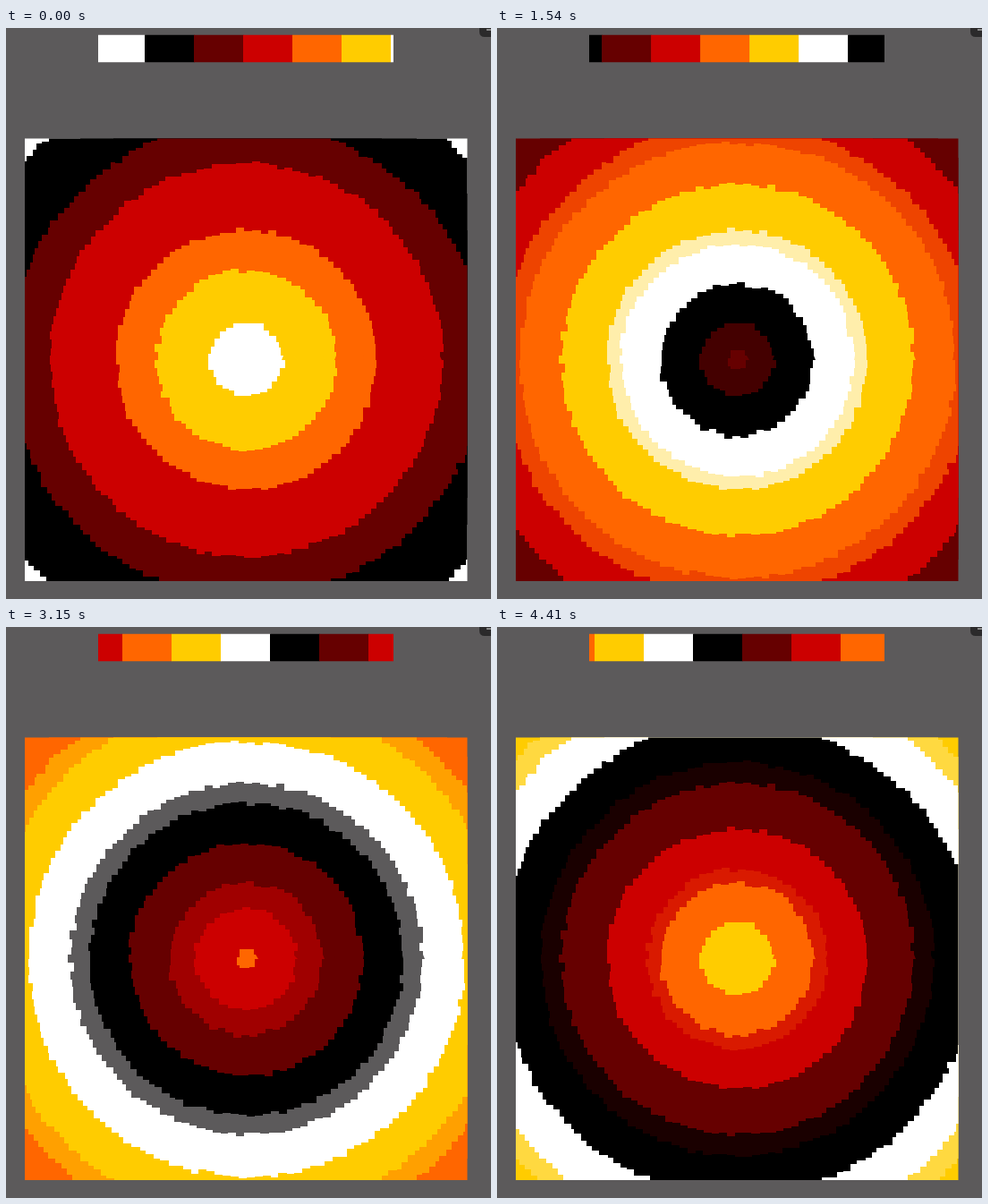
An HTML page for the animation above (4480 ms loop, 542 px wide and 638 px high).

```html
<!DOCTYPE html>
<html lang="en">
<head>
<meta charset="utf-8">
<title>Colour cycling</title>
<style>
  html, body { margin: 0; width: 100%; height: 100%; overflow: hidden; background: #5c5a5b; }
  svg { display: block; }
  .soft { filter: blur(0.5px); }
</style>
</head>
<body>
<svg id="stage" width="542" height="638" viewBox="0 0 542 638">
  <rect width="542" height="638" fill="#5c5a5b"/>
  <g class="soft">
    <svg x="103" y="7.5" width="330" height="31" overflow="hidden"><g id="bar"></g></svg>
  </g>
  <g class="soft">
    <svg id="rings" x="21" y="123.5" width="494.5" height="494.5" viewBox="21 123.5 494.5 494.5" overflow="hidden"></svg>
  </g>
  <path d="M529 0H542V10H535Q529 10 529 4Z" fill="#2b2a2b"/>
  <path d="M537 2H542" stroke="#aaa" stroke-width="1.5"/>
</svg>
<script>
const FRAME_MS = 70, LOOP_MS = 4480;
const CENTER = { x: 268.7, y: 371 };
const SWATCH = 55;
const PALETTE = [[255, 255, 255], [0, 0, 0], [102, 0, 0], [204, 0, 0], [255, 102, 0], [255, 204, 0]];
const GRAY = [92, 90, 91];
const RADII = [11, 41, 57, 85, 100.5, 130, 145, 175, 196.5, 219.5, 243.5, 265, 288, 310.5, 333];
// Colour progress at a few frames, in fifths of a palette step
const PROGRESS = [[0, 0], [14, 5.12], [22, 8.67], [32, 12.2], [45, 17.57], [53, 20.67], [63, 24.25]];

let seed = 7;
const random = () => (seed = (seed * 16807) % 2147483647) / 2147483647;
const wrap = (n, m) => ((n % m) + m) % m;
const paletteAt = n => PALETTE[wrap(n, PALETTE.length)];
const css = c => `rgb(${c.map(Math.round).join(",")})`;

function add(parent, tag, attrs) {
  const node = document.createElementNS("http://www.w3.org/2000/svg", tag);
  for (const key in attrs) node.setAttribute(key, attrs[key]);
  return parent.appendChild(node);
}

// A circle whose edge is broken into small blocky teeth
function raggedCircle(radius) {
  const count = Math.round(2 * Math.PI * radius / 4.5);
  let path = "";
  for (let i = 0; i < count; i++) {
    const angle = 2 * Math.PI * i / count;
    const reach = radius + (random() + random() - 1) * 4;
    const x = Math.round(CENTER.x + reach * Math.cos(angle));
    const y = Math.round(CENTER.y + reach * Math.sin(angle));
    // Alternate the order of the two legs so the outline stays centred
    path += !i ? `M${x} ${y}` : i % 2 ? `H${x}V${y}` : `V${y}H${x}`;
  }
  return path + "Z";
}

const bar = document.getElementById("bar");
for (let k = 0; k < 12; k++) {
  add(bar, "rect", { x: k * SWATCH, width: SWATCH + 0.5, height: 31, fill: css(paletteAt(k)) });
}

const rings = document.getElementById("rings");
const bands = [];
bands[RADII.length] = add(rings, "rect", { x: 21, y: 123, width: 495, height: 496 });
for (let i = RADII.length - 1; i >= 0; i--) {
  bands[i] = add(rings, "path", { d: raggedCircle(RADII[i]) });
}

function progressAt(frame) {
  const end = Math.max(1, PROGRESS.findIndex(([f]) => f >= frame));
  const [f0, q0] = PROGRESS[end - 1], [f1, q1] = PROGRESS[end];
  return q0 + (q1 - q0) * (frame - f0) / (f1 - f0);
}

function bandColor(progress, i) {
  const level = progress + 3 - 2 * i;
  const index = Math.floor(level / 5);
  const mix = Math.max(0, wrap(level, 5) - 4);
  const from = paletteAt(index), to = paletteAt(index + 1);
  // White turns black through a single flat gray
  if (from === PALETTE[0]) return mix < 0.3 ? from : mix < 0.85 ? GRAY : to;
  return from.map((c, n) => c + (to[n] - c) * mix);
}

function draw(time) {
  const frame = Math.floor((time % LOOP_MS) / FRAME_MS);
  bar.setAttribute("transform", `translate(${-3 - 4.222 * frame} 0)`);
  const progress = progressAt(frame);
  bands.forEach((band, i) => band.setAttribute("fill", css(bandColor(progress, i))));
}

const start = performance.now();
function tick() {
  draw(performance.now() - start);
  requestAnimationFrame(tick);
}
tick();
</script>
</body>
</html>
```
